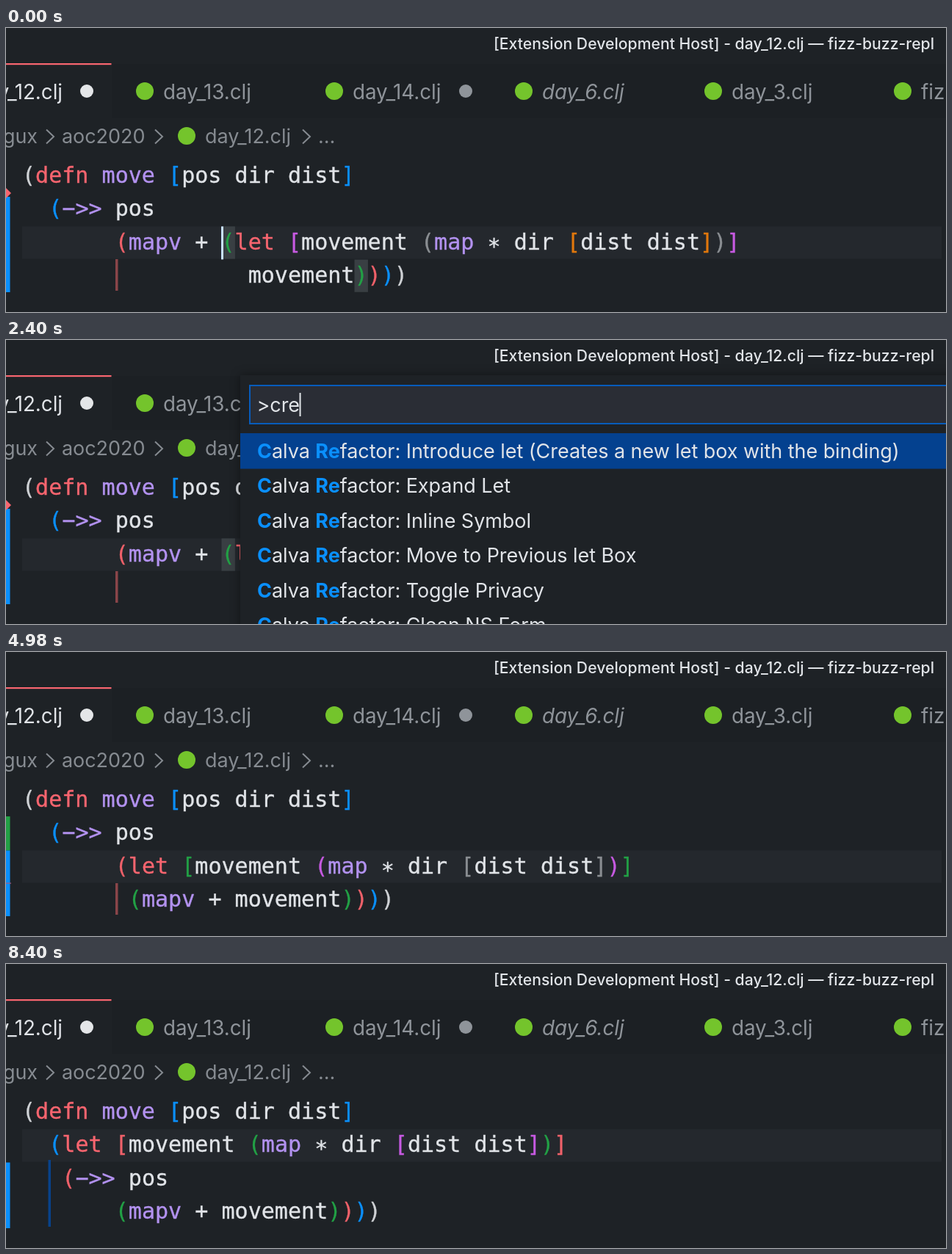
Write an HTML page that moves like this. It is 1280 px wide and 387 px high and loops after 8.76 s.

```html
<!DOCTYPE html>
<html lang="en">
<head>
<meta charset="utf-8">
<title>Expand let</title>
<style>
  html, body { margin: 0; width: 100%; height: 100%; overflow: hidden; background: #1e2226; }
  svg { display: block; width: 1280px; height: 387px; }
  text { white-space: pre; }
  .ui { font: 27px Inter, sans-serif; font-optical-sizing: none; letter-spacing: -.055px; fill: #e1e4e8; }
  .title { font-size: 21.2px; font-weight: 500; letter-spacing: 0; text-anchor: middle; }
  .tab { font-size: 27.8px; }
  .idle { fill: #8f949a; }
  .preview { font-style: italic; }
  .crumb { fill: #868b91; }
  .end { text-anchor: end; }
  .code { font: 30.06px "DejaVu Sans Mono", monospace; stroke-width: .35px; }
  .hit { font-weight: 700; fill: #0a90ff; }
  #palette { filter: drop-shadow(0 0 7px rgba(0, 0, 0, .4)); }
</style>
</head>
<body>
<svg viewBox="0 0 1280 387">
  <rect width="1280" height="387" fill="#1e2226"/>
  <g id="chrome"></g>
  <g id="scenes"></g>
  <rect id="cursor" width="3" height="45" fill="#c8e1ff"/>
  <g id="palette">
    <rect id="panel" x="319" y="48" width="980" fill="#1e2226"/>
    <rect x="332" y="62" width="980" height="52" fill="#2a2d35" stroke="#075cbb" stroke-width="2"/>
    <text id="input" class="ui" x="341.5" y="98"></text>
    <rect id="caret" y="72" width="2" height="32" fill="#e1e4e8"/>
    <rect x="319" y="127" width="961" height="48.5" fill="#04418f"/>
    <g id="rows"></g>
  </g>
</svg>
<script>
const LOOP = 8760, COL = 18.1, LEFT = 22, TOP = 180, LINE = 45.2;
const BLUE = '#0a90ff', GREEN = '#22a045', RED = '#f8656f';
const $ = id => document.getElementById(id);
const rect = (x, y, w, h, fill) => `<rect x="${x}" y="${y}" width="${w}" height="${h}" fill="${fill}"/>`;
const dot = (x, y, r, fill) => `<circle cx="${x}" cy="${y}" r="${r}" fill="${fill}"/>`;
const label = (x, y, s, cls = '') => `<text class="ui ${cls}" x="${x}" y="${y}">${s}</text>`;
const esc = s => s.replace(/>/g, '&gt;');
const colX = c => LEFT + c * COL;
const lineY = n => TOP + n * LINE;

// Title bar, tabs and breadcrumb
function chrome() {
  const icon = (x, y) => dot(x, y, 12, '#74c42c');
  const chevron = x => `<path d="M${x - 5} 138.5l10 9.5l-10 9.5" fill="none" stroke="#868b91" stroke-width="2"/>`;
  const tabs = ['day_13.clj', 'day_14.clj', 'day_6.clj', 'day_3.clj', 'fizz_buzz.clj'];
  return rect(144, 49, 1136, 74, '#1c2024') + rect(0, 48, 143.5, 2.2, RED) +
    label(964, 28.5, '[Extension Development Host] - day_12.clj — fizz-buzz-repl', 'title') +
    label(77, 97, 'day_12.clj', 'tab end') + dot(110, 86, 9, '#e4e6e8') +
    tabs.map((name, i) => icon(189 + 258 * i, 86) +
      label(214 + 258 * i, 97, name, i === 2 ? 'tab idle preview' : 'tab idle')).join('') +
    dot(626, 86, 9, '#8f949a') +
    label(43, 157, 'gux', 'crumb end') + chevron(60) + label(76, 157, 'aoc2020', 'crumb') +
    chevron(208) + icon(246, 147) + label(271, 157, 'day_12.clj', 'crumb') +
    chevron(409) + label(425, 157, '…', 'crumb');
}

// Code, with brackets coloured by depth
const RAINBOW = ['#cfd2d5', BLUE, '#f0616a', GREEN, '#c75ae2', '#8a8e92', '#e0770c'];
const TOKEN = { defn: RED, let: RED };
for (const f of ['move', '−>>', 'mapv', 'map']) TOKEN[f] = '#b392f0';

function code(lines) {
  let depth = 0;
  return lines.map((line, n) => [...line.matchAll(/[()[\]]|[^\s()[\]]+/g)].map(m => {
    const s = m[0];
    let fill = TOKEN[s] || '#e1e4e8';
    if ('(['.includes(s)) fill = RAINBOW[depth++];
    else if (')]'.includes(s)) fill = RAINBOW[--depth];
    return `<text class="code" x="${colX(m.index)}" y="${lineY(n) + 31.2}" fill="${fill}" stroke="${fill}">${esc(s)}</text>`;
  }).join('')).join('');
}

const currentLine = n => rect(LEFT, lineY(n), 1252, LINE - 1, '#24282d');
const match = (c, n) => rect(colX(c), lineY(n), 18.4, LINE - 1, '#393f43');
const DEFN = '(defn move [pos dir dist]';

const scenes = [
  currentLine(2) + match(15, 2) + match(25, 3) + rect(149, 315, 3.5, 43, '#8a4549') + code([
    DEFN,
    '  (−>> pos',
    '       (mapv + (let [movement (map ∗ dir [dist dist])]',
    '                 movement))))']),
  currentLine(2) + rect(149, 315, 3.5, 43, '#8a4549') + code([
    DEFN,
    '  (−>> pos',
    '       (let [movement (map ∗ dir [dist dist])]',
    '        (mapv + movement))))']),
  currentLine(1) + rect(57.5, 267, 3.5, 91, '#08428a') + code([
    DEFN,
    '  (let [movement (map ∗ dir [dist dist])]',
    '   (−>> pos',
    '       (mapv + movement))))']),
];

const gutters = [
  rect(0, 230, 5.5, 130, BLUE) + `<path d="M0 218l7 7l-7 7z" fill="${RED}"/>`,
  rect(0, 224, 5.5, 46.5, GREEN) + rect(0, 270.5, 5.5, 89.5, BLUE) + rect(0, 314.5, 7, 1.2, '#a35a80'),
  rect(0, 224, 5.5, 91, BLUE) + rect(0, 269.5, 5.5, 1, '#0a66b5'),
  rect(0, 270.5, 5.5, 89.5, BLUE),
];

// Command palette; *...* marks matched letters
const COMMANDS = ['Introduce let (Creates a new let box with the binding)', 'Expand Let',
  'Inline Symbol', 'Move to Previous let Box', 'Toggle Privacy', 'Clean NS Form'];
const PLAIN = 'Calva Refactor: ';
const list = (prefix, items) => items.map(s => prefix + s);
const CR = '*C*alva *R*efactor: ';
const RECENT = [COMMANDS[1], COMMANDS[0], ...COMMANDS.slice(2)];

// [time, typed text, rows]; no rows means closed
const PALETTE = [
  [0],
  [780, '', list(PLAIN, COMMANDS)],
  [1980, 'c', list('*C*alva Refactor: ', COMMANDS)],
  [2130, 'cr', list(CR, COMMANDS)],
  [2280, 'cre', list('*C*alva *Re*factor: ', COMMANDS)],
  [2460, 'crex', list(CR, ['*Ex*pand Let', '*Ex*tract Function'])],
  [2520, 'crexl', list(CR, ['*Ex*pand *L*et'])],
  [3960],
  [5100, '', list(PLAIN, RECENT)],
  [5940],
];
const SCENES = [[0, 0], [3960, 1], [5940, 2]];
const GUTTERS = [[0, 0], [4260, 1], [5940, 2], [6300, 3]];
// [time, column, line, blink start]
const CURSORS = [[0, 15, 2, -180], [3960, 8, 2, 3960], [5940, 3, 1, 5880]];

const at = (table, t) => table.findLast(row => row[0] <= t);

// Fades out and back in, 900 ms each way
function cursorOpacity(t) {
  const p = t / 900, n = Math.floor(p);
  const f = n % 2 ? 1 - (p - n) : p - n;
  const u = Math.min(1, Math.max(0, (f - .2) / .6));
  return 1 - u * u * (3 - 2 * u);
}

let shown = null;
function showPalette(step) {
  shown = step;
  const [, typed, rows] = step;
  $('palette').style.display = rows ? '' : 'none';
  if (!rows) return;
  $('input').textContent = '>' + typed;
  $('caret').setAttribute('x', 341 + $('input').getComputedTextLength());
  $('panel').setAttribute('height', 92 + rows.length * 47.4);
  $('rows').innerHTML = rows.map((s, i) =>
    label(342, 161 + i * 47.4, s.replace(/\*(.+?)\*/g, '<tspan class="hit">$1</tspan>'))).join('');
}

$('chrome').innerHTML = chrome();
$('scenes').innerHTML = [...scenes, ...gutters].map(s => `<g>${s}</g>`).join('');
const layers = [...$('scenes').children];

function draw(t) {
  const scene = at(SCENES, t)[1], gutter = scenes.length + at(GUTTERS, t)[1];
  layers.forEach((g, i) => { g.style.display = i === scene || i === gutter ? '' : 'none'; });

  const step = at(PALETTE, t);
  if (step !== shown) showPalette(step);
  $('caret').style.opacity = Math.floor((t - step[0]) / 900) % 2 ? 0 : 1;

  const [, col, line, start] = at(CURSORS, t);
  $('cursor').setAttribute('x', colX(col) - .5);
  $('cursor').setAttribute('y', lineY(line));
  $('cursor').style.opacity = step[2] ? 0 : cursorOpacity(t - start);
}

const began = performance.now();
function tick() {
  draw((performance.now() - began) % LOOP);
  requestAnimationFrame(tick);
}
tick();
</script>
</body>
</html>
```
